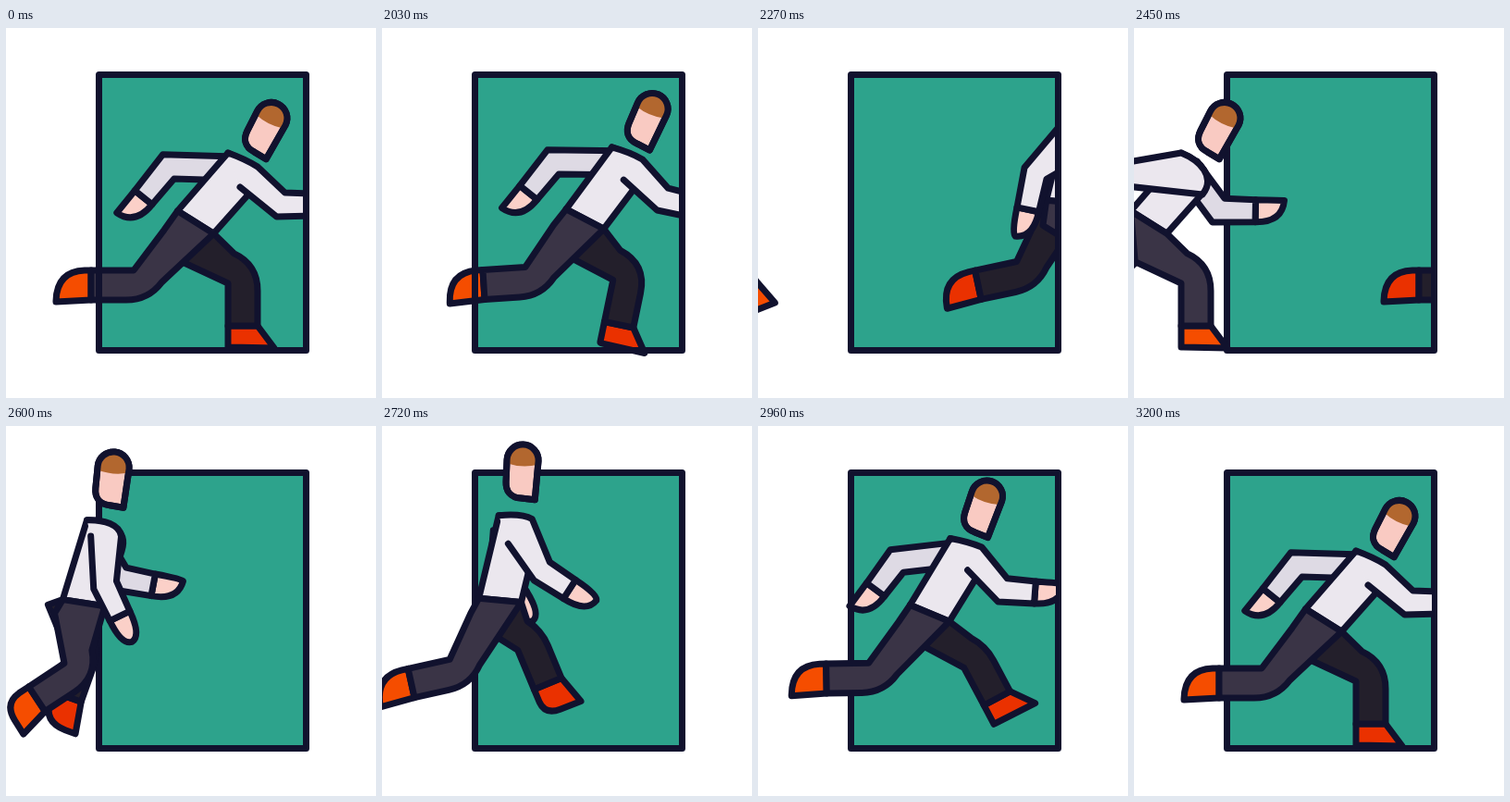
An HTML page with a canvas that plays this animation: 400 px wide and 400 px high, repeating every 3230 ms.

```html
<!DOCTYPE html>
<html lang="en">
<head>
<meta charset="utf-8">
<title>Runner through a door</title>
<style>
  html, body { margin: 0; width: 100%; height: 100%; overflow: hidden; background: #fff; }
  canvas { display: block; width: 100vw; height: 100vh; object-fit: contain; }
</style>
</head>
<body>
<canvas id="stage" width="400" height="400"></canvas>
<script>
const ctx = document.getElementById('stage').getContext('2d');
const LOOP = 3230, HOLD = 2000, TICK = 30, RUN = 1200, FIRST_STEP = 450;
const STEP_1 = 216, STEP_2 = 189;
const C = {
  ink: '#11122e', door: '#2da38c', shirt: '#ebe7ee', sleeve: '#dedae4',
  face: '#f9cac2', hand: '#fbd0c8', hair: '#b2672f',
  nearLeg: '#3a3446', farLeg: '#231f2b', nearShoe: '#f54d00', farShoe: '#ea3100'
};

// Leg cycle of two steps: when, knee x y, thigh angle, shin angle, shoe roundness
const TRAIL = [0, -67, 52, 127, 180, 1];
const SWING = [.6, 20, 54, 32, 67, .5];
const REACH = [.9, 37, 59, 28, 62, 0];
const PLANT = [1, 35, 66, 25, 90, 0];
const PUSH = [1.6, -55, 64, 115, 168, 1];
const GAIT = [TRAIL, SWING, REACH, PLANT, PUSH];

// Smooth cyclic interpolation that never overshoots the key poses
function legPose(phase) {
  const c = phase % 2, n = GAIT.length;
  const key = (i, k) => GAIT[(i + n) % n][k] + (k ? 0 : 2 * Math.floor(i / n));
  let i = n - 1;
  while (key(i, 0) > c) i--;
  const secant = (j, k) => (key(j + 1, k) - key(j, k)) / (key(j + 1, 0) - key(j, 0));
  const slope = (j, k) => {
    const a = secant(j - 1, k), b = secant(j, k);
    return a * b > 0 ? 2 * a * b / (a + b) : 0;
  };
  const h = key(i + 1, 0) - key(i, 0), u = (c - key(i, 0)) / h;
  return [1, 2, 3, 4, 5].map(k =>
    key(i, k) + (key(i + 1, k) - key(i, k)) * u * u * (3 - 2 * u) +
    h * u * (1 - u) * ((1 - u) * slope(i, k) - u * slope(i + 1, k)));
}

// Steps taken so far: an even first step, then one that eases to a stop
function stepsAt(t) {
  if (t < FIRST_STEP) return t / FIRST_STEP;
  return 2 - (1 - (t - FIRST_STEP) / (RUN - FIRST_STEP)) ** 2;
}
const wave = u => (1 - Math.cos(Math.PI * u)) / 2;

// Near arm: forward, back, and quickly forward again
function nearArm(p) {
  const s = p < 1 ? wave(p) : (2 - p) ** 3, r = Math.sqrt(s);
  return { s, a: 44.5 + 114 * s, r: 80 - 14 * r, fore: 126 * r, len: 35 + 8 * s };
}
// Far arm: back, forward and back, foreshortened while it hangs down
function farArm(p) {
  const s = p < 1 ? wave(p) : 1 - wave((p - 1) ** 2), hang = 4 * s * (1 - s);
  return { a: 167 - 110 * s, r: 66 + 8 * s - 12 * hang, fore: 129 - 128 * s + 28 * hang, len: 43 - 3 * s - 13 * hang };
}

const rad = a => a * Math.PI / 180;
const polar = (a, r = 1) => [Math.cos(rad(a)) * r, Math.sin(rad(a)) * r];
const add = (p, q, s = 1) => [p[0] + q[0] * s, p[1] + q[1] * s];
const mix = (p, q, u) => [p[0] + (q[0] - p[0]) * u, p[1] + (q[1] - p[1]) * u];
const angle = (p, q) => Math.atan2(q[1] - p[1], q[0] - p[0]) * 180 / Math.PI;

// Vector from a bend to the corner of a band of half width w
function miter(n1, n2, w) {
  const k = w / (1 + n1[0] * n2[0] + n1[1] * n2[1]);
  return [(n1[0] + n2[0]) * k, (n1[1] + n2[1]) * k];
}
function line(...pts) {
  for (const p of pts) ctx.lineTo(...p);
}
function shape(fill, trace, open) {
  ctx.beginPath();
  trace();
  if (!open) ctx.closePath();
  ctx.fillStyle = fill;
  ctx.fill();
  ctx.stroke();
}

function drawLeg(phase, hip, wl, wr, pants, shoe) {
  const [kx, ky, thigh, shin, m] = legPose(phase), w = 32;
  const knee = add(hip, [kx, ky]);
  const d1 = polar(thigh), d2 = polar(shin), n1 = polar(thigh - 90), n2 = polar(shin - 90);
  const ankle = add(knee, d2, 46);
  const at = (x, y) => add(add(ankle, n2, x), d2, y);
  const local = (p, q) => at(...mix(p, q, m));
  shape(shoe, () => {
    line(ankle, local([0, 23], [0, 7]));
    ctx.quadraticCurveTo(...local([0, 23], [1, 37]), ...local([2, 23], [33, 38]));
    line(local([50, 24], [34, 38]), at(w, 0));
  });
  shape(pants, () => {
    line(wl, add(knee, d1, -55), knee, ankle, at(w, 0), add(add(knee, n2, w), d2, 8));
    ctx.quadraticCurveTo(...add(knee, miter(n1, n2, w)), ...add(add(knee, n1, w), d1, -8));
    line(wr);
  });
}

// Corners of a bent sleeve, along its back and front edges
function sleeve(arm, sh) {
  const top = add(sh, [7, 17]), elbow = add(sh, polar(arm.a, arm.r)), wrist = add(elbow, polar(arm.fore, arm.len));
  const n1 = polar(angle(top, elbow) + 90), n2 = polar(arm.fore + 90), bend = miter(n1, n2, 13);
  return {
    wrist, n2, fore: arm.fore,
    topBack: add(top, n1, 13), topFront: add(top, n1, -13),
    elbowBack: add(elbow, bend), elbowFront: add(elbow, bend, -1),
    wristBack: add(wrist, n2, 12), wristFront: add(wrist, n2, -12)
  };
}
function drawHand(p) {
  const side = Math.max(-1, Math.min(1, p.fore / 63 - 1));
  const at = (x, y) => add(add(p.wrist, polar(p.fore), x), p.n2, y);
  shape(C.hand, () => {
    line(p.wristBack);
    ctx.quadraticCurveTo(...at(29, 12), ...at(31, 12 * side));
    ctx.quadraticCurveTo(...at(29, -12), ...p.wristFront);
  });
}

function drawHead(pos, tilt) {
  ctx.save();
  ctx.translate(...pos);
  ctx.rotate(rad(tilt));
  const outline = () => {
    ctx.arc(0, -13, 17, Math.PI, 0);
    line([15, 29], [0, 28]);
    ctx.bezierCurveTo(-12, 28, -17, 20, -17, 11);
  };
  shape(C.face, outline);
  ctx.beginPath();
  ctx.arc(0, -13, 17, Math.PI, 0);
  ctx.lineTo(17, -9);
  ctx.quadraticCurveTo(0, -4, -17, -9);
  ctx.fillStyle = C.hair;
  ctx.fill();
  ctx.beginPath();
  outline();
  ctx.closePath();
  ctx.stroke();
  ctx.restore();
}

function drawRunner(p, start) {
  // The body rises and straightens once in every step
  const lift = Math.sin(Math.PI * (p % 1) ** 1.1);
  const travel = STEP_1 * Math.min(p, 1) + STEP_2 * Math.max(p - 1, 0);
  const hip = [205 + start + travel, 210 - 22 * lift];
  const waist = polar(32 - 27 * lift, 23);
  const wl = add(hip, waist, -1), wr = add(hip, waist);
  const neck = [35 - 37 * lift, -75 - 17 * lift], sh = add(hip, neck);
  const lean = Math.atan2(neck[0], -neck[1]) - Math.atan2(35, 75);
  const cos = Math.cos(lean), sin = Math.sin(lean);
  const chest = ([x, y]) => add(sh, [x * cos - y * sin, x * sin + y * cos]);

  ctx.save();
  ctx.beginPath();
  ctx.rect(0, 0, 322, 400);
  ctx.clip();

  const far = sleeve(farArm(p), sh);
  drawHand(far);
  shape(C.sleeve, () => line(far.topBack, far.elbowBack, far.wristBack,
    far.wristFront, far.elbowFront, far.topFront));
  drawLeg(p + 1, hip, wl, wr, C.farLeg, C.farShoe);

  shape(C.shirt, () => {
    line(wl, sh);
    ctx.bezierCurveTo(...chest([20, 8]), ...chest([38, 26]), ...chest([22, 45]));
    line(wr);
  });
  drawLeg(p, hip, wl, wr, C.nearLeg, C.nearShoe);

  // The open side of the sleeve moves from the armpit to the neck as the arm swings back
  const arm = nearArm(p), near = sleeve(arm, sh), g = Math.min(1, 2 * arm.s);
  const pit = [(1 - g) * Math.max(-6, 13 - 130 * g), 37 * (1 - g)];
  const round = (a, b) => chest(mix(a, b, g));
  drawHand(near);
  shape(C.shirt, () => {
    line(chest(pit), near.elbowBack, near.wristBack, near.wristFront,
      near.elbowFront, round([32, 15], [23, 45]));
    ctx.bezierCurveTo(...round([24, 10], [38, 26]), ...round([14, 5], [20, 8]), ...sh);
  }, true);

  drawHead(add(hip, [76 - 53 * lift, -101 - 38 * lift]), 27 - 25 * lift);
  ctx.restore();
}

function draw(time) {
  const ticks = Math.floor((time % LOOP - HOLD) / TICK);
  const p = stepsAt(Math.max(0, Math.min(RUN, ticks * TICK)));
  ctx.fillStyle = '#fff';
  ctx.fillRect(0, 0, 400, 400);
  ctx.strokeStyle = C.ink;
  ctx.lineWidth = 7;
  ctx.lineJoin = ctx.lineCap = 'round';
  ctx.fillStyle = C.door;
  ctx.fillRect(100.5, 50.5, 224, 298);
  drawRunner(p, 0);
  ctx.strokeRect(100.5, 50.5, 224, 298);
  drawRunner(p, -STEP_1 - STEP_2);
}

function tick() {
  draw(performance.now());
  requestAnimationFrame(tick);
}
tick();
</script>
</body>
</html>
```
